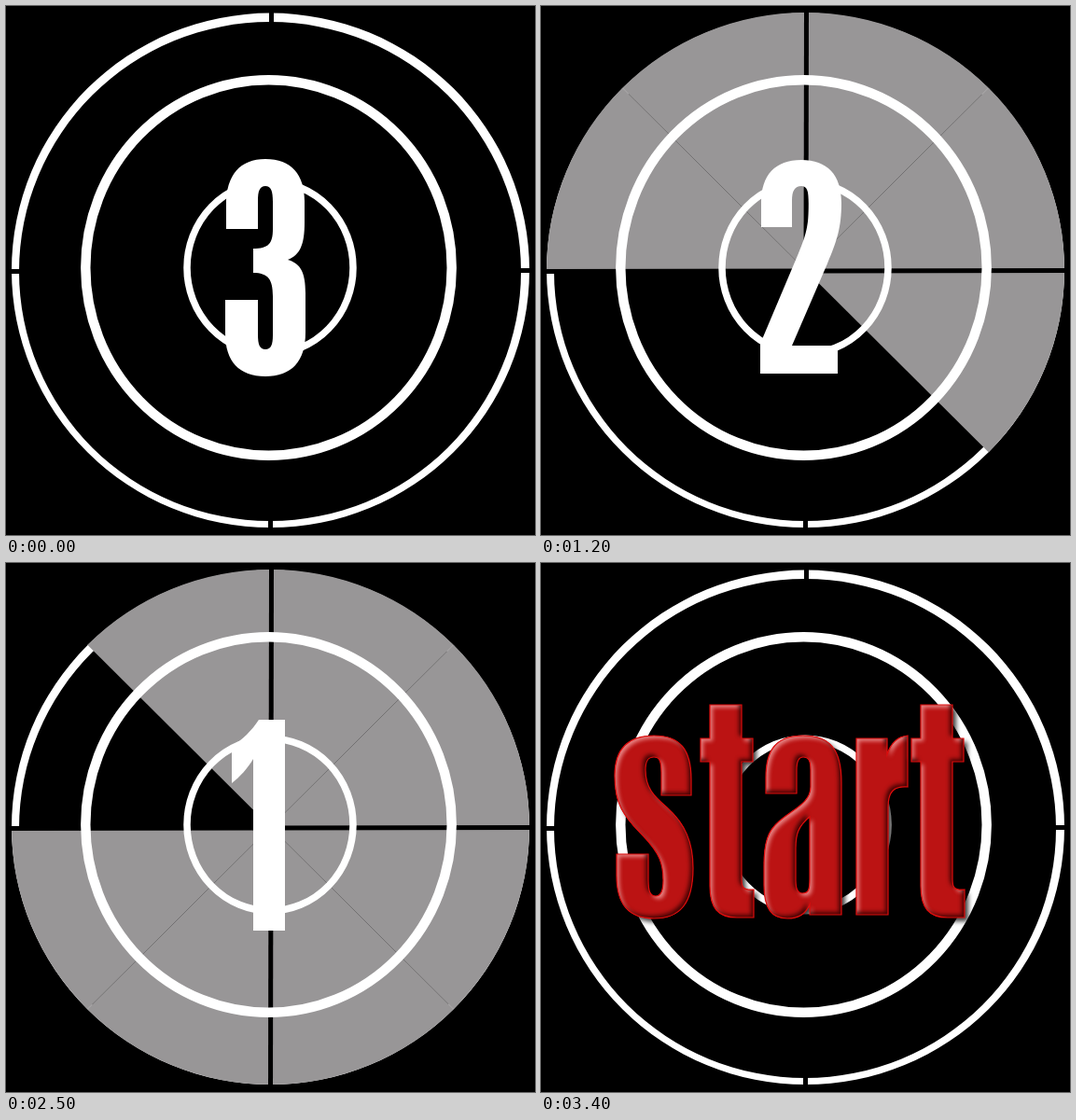
These frames come from a looping animation (567 by 567 pixels, 5400 ms). An HTML page with a canvas:

```html
<!DOCTYPE html>
<html lang="en">
<head>
<meta charset="utf-8">
<title>Countdown leader</title>
<style>
  html, body { margin: 0; width: 100%; height: 100%; overflow: hidden; background: #000; }
  canvas { display: block; }
</style>
</head>
<body>
<canvas id="stage" width="567" height="567" role="img" aria-label="3, 2, 1, start"></canvas>
<script>
const ctx = document.getElementById('stage').getContext('2d');
const SIZE = 567, CX = 283.5, CY = 283, RX = 277.5, RY = 276;
const STEP = 100, LOOP = 5400, LAST = 34;
const GRAY = '#989697';

// Condensed display lettering
const digits = {
  3: new Path2D(`M236 239V213C236 181 251 164 278 164C306 164 320 181 320 209V232
    C320 256 315 267 302 272C316 276 321 286 321 308V350C321 381 306 397 278 397
    C250 397 235 381 235 351V315H270V352C270 363 272 368 278 368C284 368 286 363 286 353
    V311C286 293 281 286 265 286V260C281 260 286 255 286 239V210C286 198 284 193 278 193
    C272 193 270 198 270 209V239Z`),
  2: new Path2D(`M236 237V211C236 181 251 165 279 165C307 165 322 181 322 211
    C322 238 317 252 307 276L269 364H318V394H235V362L276 265C284 246 287 235 287 212
    C287 198 285 193 279 193C272 193 269 198 269 209V237Z`),
  1: new Path2D('M265 394V210C259 220 251 229 242 236V196C253 190 264 179 271 168H299V394Z')
};

const t = new Path2D(`M181 152H215V188H227V213H215V339C215 348 217 351 228 350V380H210
  C190 380 181 370 181 346V213H171V188H181Z`);
const word = new Path2D(`M161 249H129V225C129 212 127 208 121 208C114 208 112 213 112 222
  C112 241 121 250 135 262C155 280 163 300 163 327C163 365 149 381 121 381
  C93 381 81 365 81 335V312H115V340C115 352 117 357 123 357C129 357 131 351 131 340
  C131 322 127 311 110 293C88 271 79 258 79 228C79 200 93 185 121 185
  C149 185 161 200 161 232Z
  M241 247H274V222C274 212 276 208 281 208C287 208 289 212 289 222V240
  C289 257 270 264 255 277C243 287 239 300 239 325V345C239 370 247 381 264 381
  C277 381 284 376 288 366V377H322V235C322 200 310 185 281 185C252 185 241 200 241 230Z
  M288 272C276 282 273 290 273 306V340C273 350 275 354 280 354C287 354 288 350 288 338Z
  M338 377V188H371V205C375 193 382 186 393 185V240C378 239 372 245 372 262V377Z`);
word.addPath(t);
word.addPath(t, new DOMMatrix([1, 0, 0, 1, 226, 0]));

const outside = new Path2D('M-50 -50H617V617H-50Z');
outside.addPath(word);

function shadow(color, offset, blur) {
  ctx.shadowColor = color;
  ctx.shadowOffsetX = ctx.shadowOffsetY = offset;
  ctx.shadowBlur = blur;
}

function ring(x, y, rx, ry, width) {
  ctx.beginPath();
  ctx.ellipse(x, y, rx, ry, 0, 0, 2 * Math.PI);
  ctx.lineWidth = width;
  ctx.strokeStyle = '#fff';
  ctx.stroke();
}

// Eighths are counted counterclockwise from the left.
function sector(from, to) {
  const angle = i => Math.PI * (1 - i / 4);
  ctx.beginPath();
  ctx.moveTo(CX, CY);
  ctx.ellipse(CX, CY, RX, RY, 0, angle(from), angle(to), true);
  ctx.closePath();
}

function bar(x1, y1, x2, y2) {
  ctx.beginPath();
  ctx.moveTo(x1, y1);
  ctx.lineTo(x2, y2);
  ctx.lineWidth = 5;
  ctx.strokeStyle = '#000';
  ctx.stroke();
}

function outerRing() {
  ctx.beginPath();
  ctx.ellipse(CX, 283.3, RX, 275.7, 0, 0, 2 * Math.PI);
  ctx.ellipse(283, 284.5, 269, 267.5, 0, 0, 2 * Math.PI);
  ctx.fillStyle = '#fff';
  ctx.fill('evenodd');
}

function drawWord(revealed) {
  ctx.save();
  if (revealed < 8) {
    sector(0, revealed);
    ctx.clip();
  }
  ctx.save();
  shadow('rgba(0,0,0,.75)', 4, 5);
  ctx.fillStyle = '#bb1313';
  ctx.fill(word, 'evenodd');
  ctx.restore();

  // Bevel: light from the upper left, shade at the lower right
  ctx.save();
  ctx.clip(word, 'evenodd');
  ctx.fillStyle = '#bb1313';
  shadow('rgba(255,190,190,.65)', 3, 4);
  ctx.fill(outside, 'evenodd');
  shadow('rgba(50,0,0,.85)', -3, 4);
  ctx.fill(outside, 'evenodd');
  ctx.restore();

  ctx.lineWidth = 1.2;
  ctx.strokeStyle = '#e00c0c';
  ctx.stroke(word);
  ctx.restore();
}

// Which digit shows, and which run of eighths is gray
function stateAt(step) {
  if (step < 9) return { digit: 3, from: 0, to: Math.min(step, 8) };
  if (step < 18) return { digit: 2, from: step - 9, to: 8 };
  if (step < 27) return { digit: 1, from: 0, to: step - 18 };
  return { from: step - 26, to: 8 };
}

function draw(time) {
  const { digit, from, to } = stateAt(Math.min(LAST, Math.floor(time % LOOP / STEP)));
  ctx.fillStyle = '#000';
  ctx.fillRect(0, 0, SIZE, SIZE);
  outerRing();

  ctx.fillStyle = GRAY;
  for (let i = from; i < to; i++) {
    sector(i, i + 1);
    ctx.fill();
  }
  bar(284.5, 0, 283.5, SIZE);
  bar(0, 284.5, SIZE, 283.5);
  ring(281.5, 280.5, 196.2, 201.3, 10.4);
  ring(283, 280.5, 89, 92.3, 7.5);

  if (digit) {
    ctx.fillStyle = '#fff';
    ctx.fill(digits[digit]);
  } else {
    drawWord(from);
  }
}

function tick() {
  draw(performance.now());
  requestAnimationFrame(tick);
}
tick();
</script>
</body>
</html>
```
